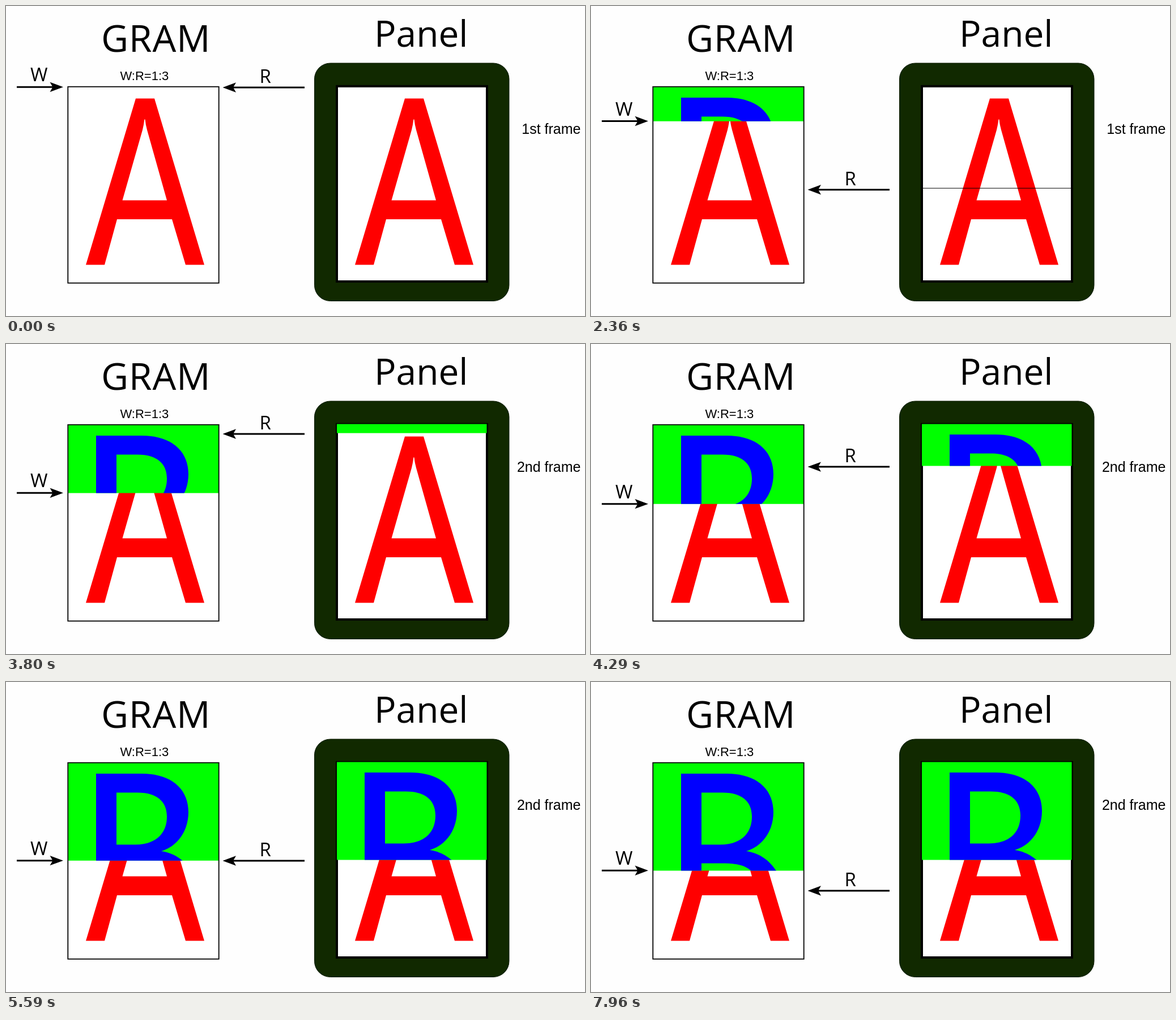
Animation of 1022x548 px, one loop 8 s. Source, as an HTML page:

```html
<!DOCTYPE html>
<html lang="en">
<head>
<meta charset="utf-8">
<title>GRAM write and panel read</title>
<style>
html, body { margin: 0; width: 100%; height: 100%; overflow: hidden; background: #fefefe; }
svg { display: block; width: 100%; height: 100%; }
.title, .tag { font-family: "Open Sans", "Noto Sans", sans-serif; }
.tag { font-size: 33px; }
.note { font-family: "Liberation Sans", Arial, sans-serif; }
</style>
</head>
<body>
<svg viewBox="0 0 1022 548" xmlns="http://www.w3.org/2000/svg">
  <defs>
    <path id="oldLetter" fill="#f00" fill-rule="evenodd" d="M229 163.5H262L350 457.5H317L293 377H196L174 457.5H141Z
      M205.5 343.5H284L249 219Q246.500 210 245.500 200.500H244.300Q243.300 210 241 219Z"/>
    <path id="newLetter" fill="#00f" fill-rule="evenodd" d="M159 162H240C292 162 322 189 322 230C322 262 304 290 274 299
      C300 303 316 317 327 334L336 350H159Z
      M195 195.5H232C262 195.5 284 208 284 238C284 270 262 287.5 228 287.5H195Z
      M195 320.5H228C256 320.5 270 323 283 334L292 350H195Z"/>
    <clipPath id="gramClip"><rect id="gramArea" x="109" y="143" width="267" height="0"/></clipPath>
    <clipPath id="panelClip"><rect id="panelArea" x="584" y="141.500" width="264.500" height="0"/></clipPath>
  </defs>

  <text class="title" x="168" y="80.500" font-size="66" letter-spacing=".8">GRAM</text>
  <text class="title" x="650" y="72" font-size="64">Panel</text>
  <text class="note" x="201.500" y="131" font-size="22">W:R=1:3</text>
  <text class="note" id="label" x="1014.500" y="226" font-size="25" text-anchor="end"></text>

  <rect x="109" y="143" width="267" height="346.500" fill="#fff"/>
  <use href="#oldLetter"/>
  <g clip-path="url(#gramClip)">
    <rect x="109" y="143" width="267" height="347" fill="#0f0"/>
    <use href="#newLetter"/>
  </g>
  <rect x="109.300" y="142.700" width="266.400" height="347" fill="none" stroke="#000" stroke-width="1.800"/>

  <rect x="544.500" y="101" width="343.500" height="420.500" rx="28" fill="#112900" stroke="#0a1800"/>
  <rect x="584" y="141.800" width="265" height="345.200" fill="#fff" stroke="#000" stroke-width="4"/>
  <use href="#oldLetter" x="475"/>
  <path id="scan" d="M586 0H847" stroke="#000" stroke-width="1"/>
  <g clip-path="url(#panelClip)">
    <rect x="584" y="141" width="265" height="346" fill="#0f0"/>
    <use href="#newLetter" x="474" y="-2"/>
  </g>

  <g id="writer">
    <text class="tag" x="43" y="-10">W</text>
    <path d="M19 0H84" stroke="#000" stroke-width="3"/>
    <path d="M101 0L77.500 -8.700L82.500 0L77.500 8.700Z"/>
  </g>
  <g id="reader">
    <text class="tag" x="447.500" y="-8">R</text>
    <path d="M527 0H400" stroke="#000" stroke-width="3"/>
    <path d="M382.500 0L406 -8.700L401 0L406 8.700Z"/>
  </g>
</svg>
<script>
const LOOP = 8000, TOP = 144, LAP = 345, PANEL_END = 517;

// Runs of even steps: first time, last time, intervals, first and last read distance
const runs = [
  [950, 1720, 18, 5.4, 101.9],
  [1780, 2580, 19, 107.2, 207],
  [2640, 2780, 4, 215, 244],
  [2920, 3700, 18, 248.5, 343.5],
  [3740, 3800, 2, 349.4, 360],
  [3800, 4490, 16, 360, 444.5],
  [4550, 5110, 13, 449.8, 517],
  [7530, 7960, 10, 521.8, 570]
];

const el = id => document.getElementById(id);
const [label, scan, writer, reader, gramArea, panelArea] =
  ["label", "scan", "writer", "reader", "gramArea", "panelArea"].map(el);
const moveTo = (node, y) => node.setAttribute("transform", `translate(0 ${y.toFixed(2)})`);
const fillTo = (area, y) =>
  area.setAttribute("height", Math.max(0, y - area.getAttribute("y")).toFixed(2));

function distance(t) {
  let d = 0;
  for (const [start, end, count, from, to] of runs) {
    if (t < start) break;
    const step = Math.min(count, Math.floor((t - start) / (end - start) * count + 0.25));
    d = from + (to - from) * step / count;
  }
  return d;
}

function draw(t) {
  const d = distance(t);
  const second = d >= LAP;
  const writeY = TOP - 0.7 + d / 3;
  const readY = TOP + d % LAP;
  moveTo(writer, writeY);
  moveTo(reader, readY);
  fillTo(gramArea, d ? writeY + 0.2 : 0);
  fillTo(panelArea, second ? TOP + Math.min(d, PANEL_END) - LAP - 1.6 : 0);
  moveTo(scan, readY - 2.6);
  scan.setAttribute("visibility", second || !d ? "hidden" : "visible");
  label.textContent = second ? "2nd frame" : "1st frame";
}

function tick() {
  draw(performance.now() % LOOP);
  requestAnimationFrame(tick);
}
tick();
</script>
</body>
</html>
```
